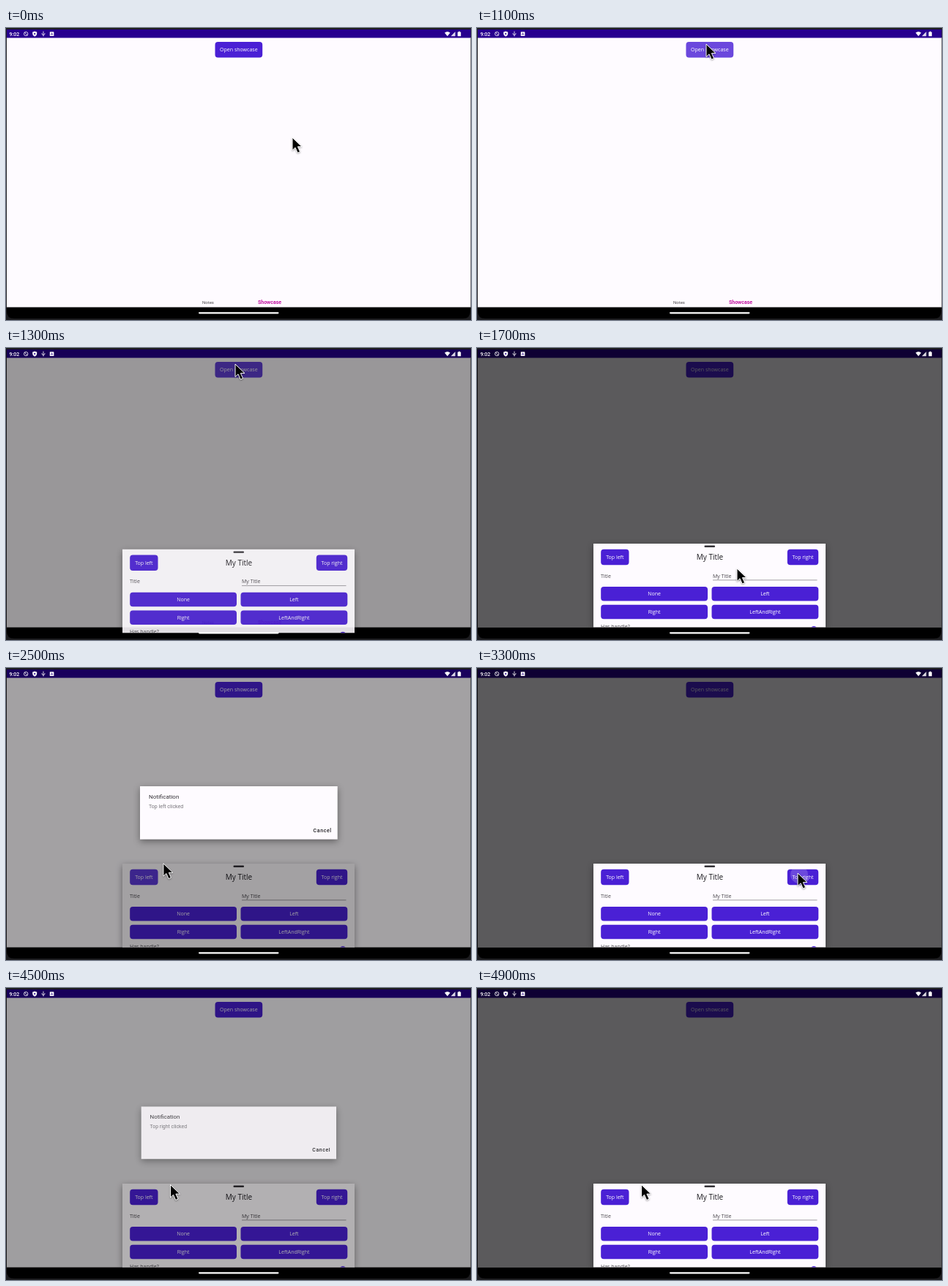
Animation of 635 by 400 pixels, one loop 5 s. Source, as an HTML page:

```html
<!DOCTYPE html>
<html lang="en">
<head>
<meta charset="utf-8">
<title>Bottom sheet demo</title>
<style>
  html, body { margin: 0; height: 100%; overflow: hidden; background: #1d1d20; }
  svg { display: block; width: 635px; height: 400px; }
  text { font: 7px "Open Sans", sans-serif; fill: #4a484c; }
  .btn text { fill: #fff; text-anchor: middle; }
  .btn rect { fill: #4a20d5; }
  .ripple { fill: #fff; }
  .roboto { font-family: Roboto, sans-serif; }
  .mid { text-anchor: middle; }
  .paper { fill: #fefbff; }
  .shadow { filter: drop-shadow(0 3px 5px rgba(0, 0, 0, .4)); }
  #cursor { filter: drop-shadow(0 1px 1px rgba(0, 0, 0, .35)); }
</style>
</head>
<body>
<svg viewBox="0 0 635 400">
  <defs>
    <clipPath id="sheetClip"><rect x="159" y="268" width="317" height="114.5"/></clipPath>
  </defs>

  <path d="M1 2H634V388Q634 398 624 398H11Q1 398 1 388Z"/>
  <rect class="paper" x="1" y="13" width="633.5" height="369.5"/>
  <rect x="1" y="2" width="633.5" height="11.5" fill="#27008f"/>
  <g id="page"></g>
  <text class="roboto mid" x="276" y="377.7" style="font-size:6px">Notes</text>
  <text class="roboto mid" x="360" y="377.7" style="font-weight:700;fill:#c216a4">Showcase</text>
  <rect id="pageDim" y="2" width="635" height="380.5"/>

  <g id="sheet">
    <rect class="paper shadow" x="159" y="268" width="317" height="114.5"/>
    <g clip-path="url(#sheetClip)">
      <rect x="310.5" y="270.6" width="14.5" height="2.3" rx="1" fill="#333136"/>
      <text class="mid" x="318" y="290" style="font-size:10px;fill:#1c1b1f">My Title</text>
      <text x="169" y="314.7">Title</text>
      <text x="322" y="314.7">My Title</text>
      <rect x="322" y="317.6" width="142.5" height=".7" fill="#77757a"/>
      <g id="sheetButtons"></g>
      <text x="169" y="383.7">Has handle?</text>
      <circle cx="460" cy="385" r="4" fill="#4a20d5"/>
    </g>
  </g>
  <rect id="sheetDim" y="2" width="635" height="380.5"/>

  <g id="dialog">
    <rect class="paper shadow" x="183" y="162" width="269.7" height="72.7"/>
    <text class="roboto" x="195" y="178.8" style="font-size:8px;fill:#333136">Notification</text>
    <text class="roboto" id="message" x="195" y="192.4" style="fill:#77757a"></text>
    <text class="roboto" x="419.6" y="224.5" style="font-weight:500;letter-spacing:.6px;fill:#1c1b1f">Cancel</text>
  </g>

  <g fill="#fff">
    <text class="roboto" x="4.5" y="10.6" style="font-weight:500;fill:#fff">9:02</text>
    <path d="M25.3 5.8L29 10.2" stroke="#fff" stroke-width=".8"/>
    <circle cx="27.2" cy="8" r="2.7" fill="none" stroke="#fff" stroke-width=".8"/>
    <path d="M39.2 4.5L42.2 5.6V8Q42.2 10.6 39.2 11.8Q36.2 10.6 36.2 8V5.6Z"/>
    <circle cx="39.2" cy="8" r="1.1" fill="#27008f"/>
    <path d="M51 4.5V11.5M49 7.2V8.4L51 9.8L53 8.4V7.2" fill="none" stroke="#fff" stroke-width=".8"/>
    <rect x="59.8" y="5.2" width="5.6" height="5.8" rx=".6"/>
    <path d="M61.3 9.8L62.6 6.6L63.9 9.8M61.8 8.8H63.4" fill="none" stroke="#27008f" stroke-width=".6"/>
    <path d="M599 6.4Q602.8 3.4 606.6 6.4L602.8 11.3Z"/>
    <path d="M607.5 11.2L613.5 5V11.2Z" fill-opacity=".85"/>
    <path d="M616.7 5.4H618V4.7H620V5.4H621.2V11.3H616.7Z"/>
    <rect x="263" y="389.2" width="109.5" height="2.2" rx="1.1"/>
  </g>

  <path id="cursor" d="M0 0V17.5L4 13.8L7.2 21L10.6 19.5L7.4 12.6H13Z" stroke="#fff" stroke-width="1" stroke-linejoin="round"/>
</svg>

<script>
const LOOP = 5000, STEP = 100;
const el = id => document.getElementById(id);
const mix = (a, b, p) => a + (b - a) * p;
const ramp = (t, a, b) => Math.min(1, Math.max(0, (t - a) / (b - a)));
const smooth = p => p * p * (3 - 2 * p);

function button(parent, id, label, x, y, w, h, tapX = 0, tapY = 0) {
  const box = `x="${x}" y="${y}" width="${w}" height="${h}" rx="4"`;
  el(parent).insertAdjacentHTML("beforeend", `<g class="btn">
    <clipPath id="${id}Clip"><rect ${box}/></clipPath><rect ${box}/>
    <text x="${x + w / 2}" y="${y + h / 2 + 2.6}">${label}</text>
    <g clip-path="url(#${id}Clip)"><circle class="ripple" id="${id}" cx="${tapX}" cy="${tapY}" r="0"/></g></g>`);
}

button("page", "open", "Open showcase", 285.5, 19, 64.7, 21.5, 314, 24);
button("sheetButtons", "left", "Top left", 169.2, 275.8, 38.3, 21.4, 187, 285);
button("sheetButtons", "right", "Top right", 423.8, 275.8, 42.4, 21.4, 440, 283);
["None", "Left", "Right", "LeftAndRight"].forEach((label, i) =>
  button("sheetButtons", label, label, i % 2 ? 320.5 : 169.2, i < 2 ? 327 : 351.8, 145.8, 19.5));

// Pointer stops: time, x, y
const stops = [
  [0, 391, 150], [200, 391, 150], [900, 313, 22], [1400, 313, 22], [1700, 355, 302],
  [2000, 186, 284], [2300, 186, 284], [2600, 225, 262], [2800, 225, 262],
  [3100, 438, 281], [3500, 438, 281], [3800, 299, 203], [4200, 224.5, 269.5], [LOOP, 224.5, 269.5]
];

function pointer(t) {
  const i = stops.findIndex(s => s[0] > t);
  const [t0, x0, y0] = stops[i - 1], [t1, x1, y1] = stops[i];
  const p = smooth(ramp(t, t0, t1));
  return [mix(x0, x1, p), mix(y0, y1, p)];
}

function ripple(id, t, start) {
  el(id).setAttribute("r", t < start ? 0 : 12 + 50 * ramp(t, start, start + 200));
  el(id).setAttribute("opacity", .18 * (1 - ramp(t, start + 300, start + 800)));
}

const shown = (t, open, close) => smooth(ramp(t, open, open + 250)) * (1 - smooth(ramp(t, close, close + 200)));

function draw(t) {
  ripple("open", t, 900);
  ripple("left", t, 2000);
  ripple("right", t, 3300);

  const rise = 1 - (1 - ramp(t, 1100, 1400)) ** 2;
  el("sheet").setAttribute("transform", `translate(0 ${70 * (1 - rise)})`);
  el("sheet").setAttribute("opacity", rise);

  const alert = t < 3200 ? shown(t, 2200, 2650) : shown(t, 3450, 4450);
  el("pageDim").setAttribute("opacity", .64 * ramp(t, 1100, 1420) * (1 - alert));
  el("sheetDim").setAttribute("opacity", .36 * alert);
  el("message").textContent = `Top ${t < 3200 ? "left" : "right"} clicked`;
  el("dialog").setAttribute("opacity", alert);
  el("dialog").setAttribute("transform",
    `translate(318 198.5) scale(${mix(.92, 1, alert)}) translate(-318 -198.5)`);

  el("cursor").setAttribute("transform", `translate(${pointer(t)})`);
}

function tick() {
  draw(Math.floor(performance.now() % LOOP / STEP) * STEP);
  requestAnimationFrame(tick);
}
tick();
</script>
</body>
</html>
```
